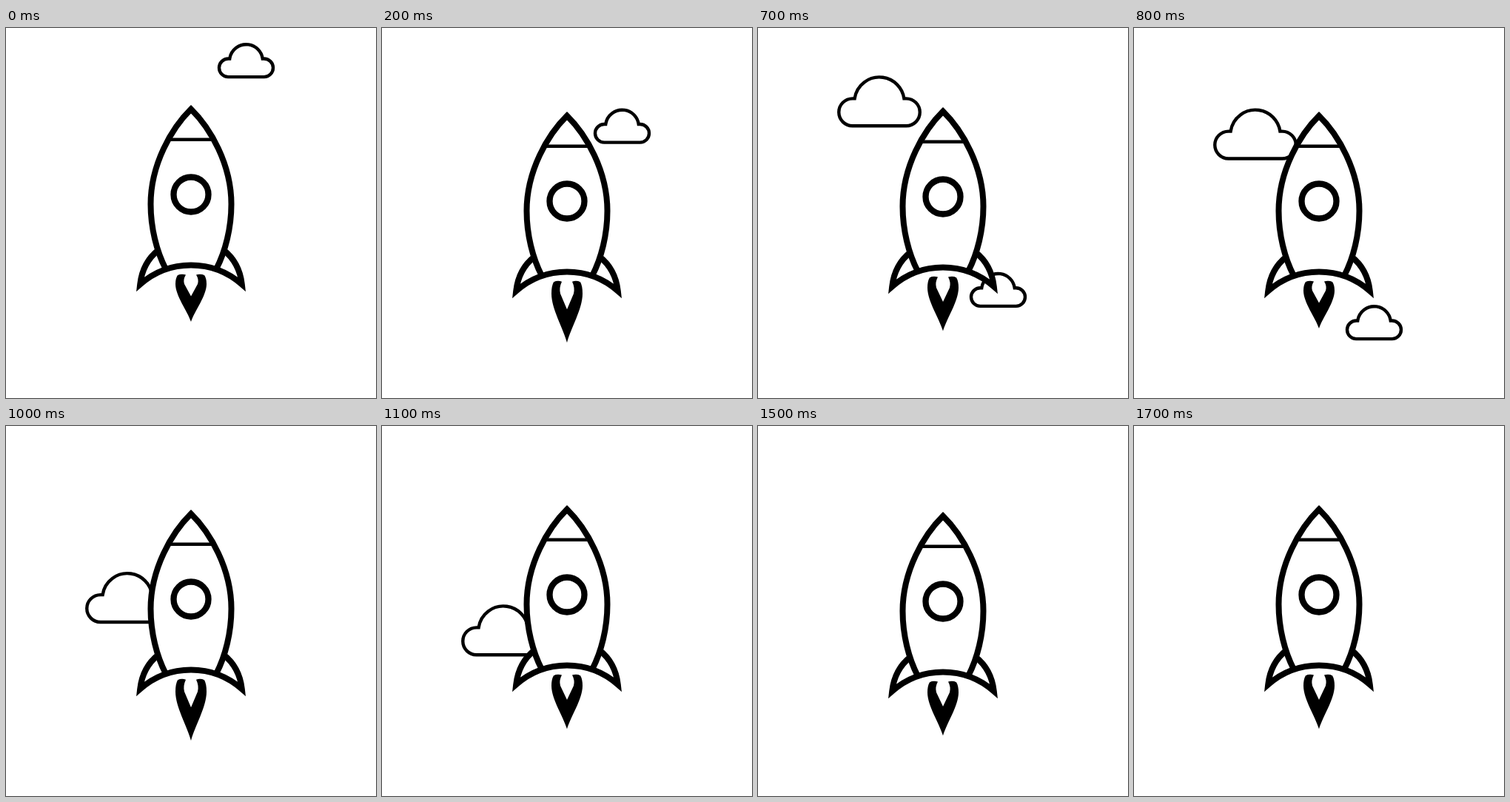
Recreate the animation shown at these times as an HTML page with a canvas. Size 500 by 500 pixels, loop 1800 ms.

```html
<!DOCTYPE html>
<html lang="en">
<head>
<meta charset="utf-8">
<title>Rocket</title>
<style>
  html, body { margin: 0; width: 100%; height: 100%; overflow: hidden; background: #fff; }
  canvas { display: block; width: 100vmin; height: 100vmin; }
</style>
</head>
<body>
<canvas id="stage" width="500" height="500"></canvas>
<script>
const ctx = document.getElementById('stage').getContext('2d');
const STEP = 100, STEPS = 18, FALL = 44.25;

const hull = new Path2D(`M216 326 C203.5 302 195.5 270 195.5 238 C195.5 184 224 135 250 109.6
  C276 135 304.5 184 304.5 238 C304.5 270 296.5 302 284 326`);
const skirt = new Path2D(`M206 300 Q184.5 317 181.2 346.5 A104 104 0 0 1 318.8 346.5 Q315.5 317 294 300`);
const flame = new Path2D(`M232 334 Q237 332 243 333.5 Q239 340 241 346 L250 362.5
  L259 346 Q261 340 257 333.5 Q263 332 268 334 Q271 338 271 346
  C271 362 255 382 250 397 C245 382 229 362 229 346 Q229 338 232 334 Z`);

function stroke(width, path) {
  ctx.lineWidth = width;
  path ? ctx.stroke(path) : ctx.stroke();
}

function cloud(cx, top, scale) {
  const lobe = 12.3 * scale, crown = 22.5 * scale, side = 24.2 * scale;
  const lobeY = top + 31.6 * scale;
  const lift = Math.asin(3.2 / 22.5);
  ctx.beginPath();
  ctx.arc(cx - side, lobeY, lobe, Math.PI / 2, Math.PI * 1.5);
  ctx.arc(cx, top + crown, crown, Math.PI + lift, -lift);
  ctx.arc(cx + side, lobeY, lobe, -Math.PI / 2, Math.PI / 2);
  ctx.closePath();
  stroke(4.4);
}

function rocket(bob, stretch) {
  ctx.save();
  ctx.translate(0, bob);

  ctx.fillStyle = '#fff';
  for (const part of [skirt, hull]) ctx.fill(part);
  for (const part of [skirt, hull]) stroke(8, part);

  ctx.beginPath();
  ctx.moveTo(220, 150.8);
  ctx.lineTo(280, 150.8);
  stroke(4.4);

  ctx.beginPath();
  ctx.arc(250, 225, 23.5, 0, Math.PI * 2);
  stroke(8.3);

  // The flame grows downwards from its upper edge.
  ctx.translate(0, 333);
  ctx.scale(1, stretch);
  ctx.translate(0, -333);
  ctx.fillStyle = '#000';
  ctx.fill(flame);
  ctx.restore();
}

function draw(n) {
  ctx.fillStyle = '#fff';
  ctx.fillRect(0, 0, 500, 500);
  ctx.strokeStyle = '#000';

  if (n < 10) cloud(324.5, 22.2 + FALL * n, 1);
  if (n >= 7 && n < 15) cloud(164, 22.2 + FALL * (n - 6), 1.5);

  const bob = 6 * (1 - Math.cos(n * Math.PI / 3));
  const stretch = 1 + 0.15 * (1 - Math.cos(n * Math.PI / 2));
  rocket(bob, stretch);
}

const start = performance.now();
function tick() {
  draw(Math.floor((performance.now() - start) / STEP) % STEPS);
  requestAnimationFrame(tick);
}
tick();
</script>
</body>
</html>
```
